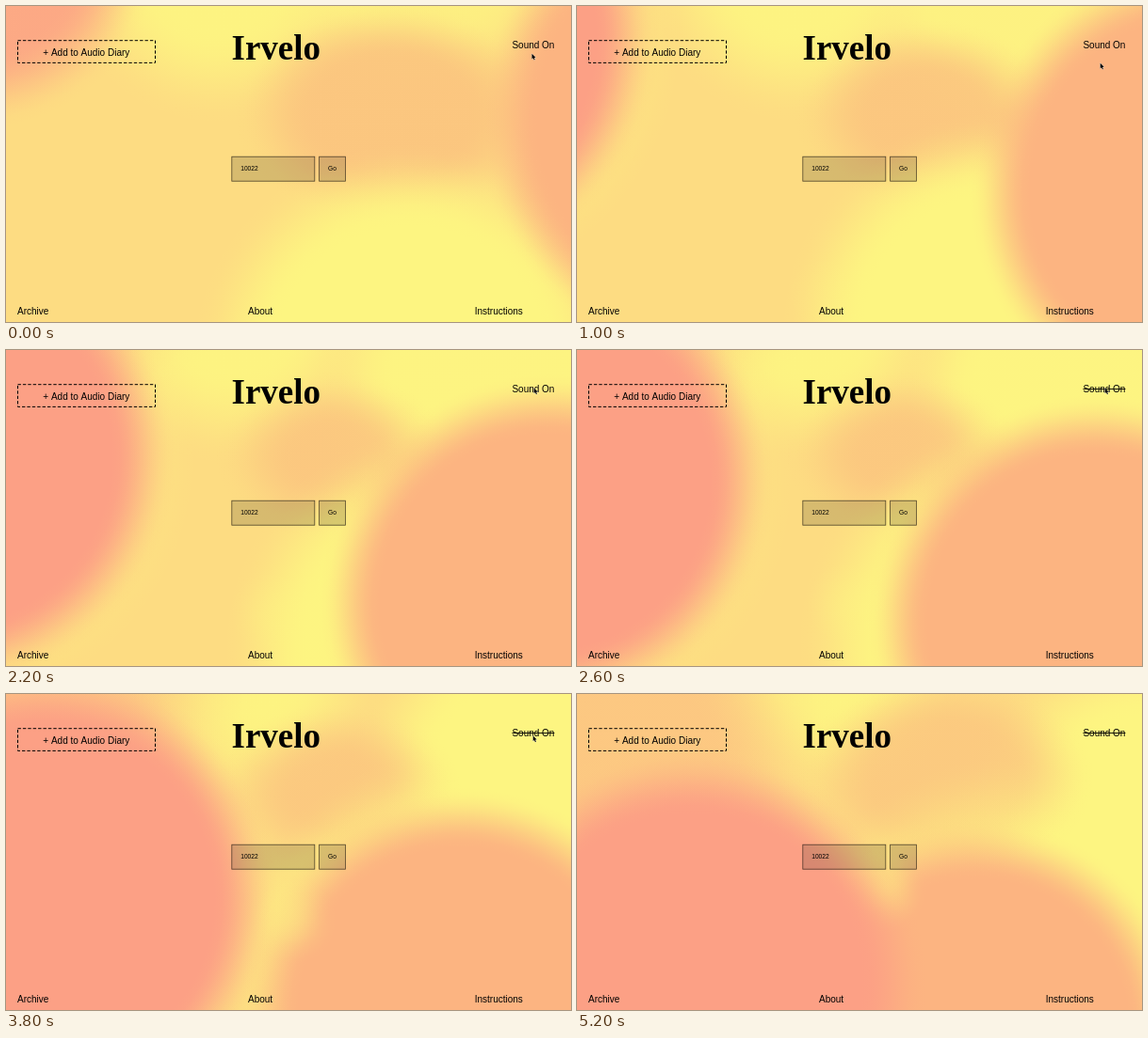
Recreate the animation shown at these times as an HTML page with a canvas. Size 600x336 px, loop 5.3 s.

```html
<!DOCTYPE html>
<html lang="en">
<head>
<meta charset="utf-8">
<title>Irvelo</title>
<style>
  html, body { margin: 0; width: 100%; height: 100%; overflow: hidden; background: #fddc82; }
  canvas { display: block; width: 600px; height: 336px; }
</style>
</head>
<body>
<canvas id="stage" width="600" height="336"></canvas>
<script>
const ctx = document.getElementById('stage').getContext('2d');
const W = 600, H = 336, LOOP = 5300, STEP = 100;
const SANS = '"Liberation Sans", Arial, sans-serif';
const SERIF = '"Liberation Serif", Times, serif';

const BASE = '#fddc82';
const YELLOW = '253,245,129', ORANGE = '252,180,129';
const PEACH = '251,196,127', SALMON = '252,160,133';

const clamp = v => Math.max(0, Math.min(1, v));
const smooth = v => v * v * (3 - 2 * v);
const ramp = (t, from, to) => clamp((t - from) / (to - from));

// Drift from a to b, bowed sideways by bend at the midpoint.
const drift = (a, b, bend = 0) => u => a + (b - a) * u + bend * 4 * u * (1 - u);
const still = v => () => v;

const salmonX = drift(-245, 122, 22), salmonY = drift(-30, 308);

// Soft discs from back to front.
const BLOBS = [
  { color: YELLOW, x: drift(225, 265), y: drift(-45, -25), r: drift(122, 95), soft: 50, alpha: still(0.92) },
  { color: YELLOW, x: salmonX, y: salmonY, r: still(240), soft: 36, alpha: drift(0.4, 0.1) },
  { color: ORANGE, x: drift(40, 60), y: drift(-290, 60), r: still(150), soft: 70, alpha: still(0.5) },
  { color: YELLOW, x: drift(440, 625, 10), y: drift(-75, 165), r: drift(140, 190), soft: 45, alpha: drift(0.75, 1, 0.1) },
  { color: PEACH, x: drift(410, 392, -55), y: drift(115, 88, 10), r: drift(125, 115, -38),
    ratio: 0.72, soft: 42, alpha: drift(0.9, 0.75) },
  { color: YELLOW, x: drift(430, 455, 25), y: drift(380, 300, -30), r: still(190), soft: 44, alpha: drift(1, 0.5, 0.2) },
  { color: ORANGE, x: drift(757, 424, -40), y: drift(120, 360, 50), r: drift(225, 195), soft: 32, alpha: still(1) },
  { color: YELLOW, x: drift(250, 324), y: drift(330, 208), r: still(24), soft: 24, alpha: drift(0, 0.5) },
  { color: SALMON, x: drift(-30, -630), y: drift(-60, -260), r: still(150), soft: 40, alpha: still(0.85) },
  { color: SALMON, x: salmonX, y: salmonY, r: still(215), soft: 34, alpha: still(1) }
];

function drawBlob({ color, x, y, r, soft, alpha, ratio = 1 }, u) {
  const radius = r(u), opacity = clamp(alpha(u));
  const outer = radius + soft;
  const gradient = ctx.createRadialGradient(0, 0, Math.max(0, radius - soft), 0, 0, outer);
  for (let k = 0; k <= 8; k++) {
    gradient.addColorStop(k / 8, `rgba(${color},${opacity * (1 - smooth(k / 8))})`);
  }
  ctx.save();
  ctx.translate(x(u), y(u));
  ctx.scale(1, ratio);
  ctx.fillStyle = gradient;
  ctx.beginPath();
  ctx.arc(0, 0, outer, 0, Math.PI * 2);
  ctx.fill();
  ctx.restore();
}

function text(str, x, y, size = 10, family = SANS, weight = '') {
  ctx.font = `${weight} ${size}px ${family}`;
  ctx.fillStyle = '#000';
  ctx.fillText(str, x, y);
}

function field(x, w, label, labelX) {
  ctx.fillStyle = 'rgba(0,0,0,0.15)';
  ctx.fillRect(x, 160, w, 26.5);
  ctx.strokeStyle = 'rgba(20,15,10,0.7)';
  ctx.lineWidth = 0.8;
  ctx.strokeRect(x, 160.2, w, 26);
  text(label, labelX, 175.3, 6.67);
}

function drawPage() {
  ctx.strokeStyle = '#000';
  ctx.lineWidth = 1;
  ctx.setLineDash([3.4, 2]);
  ctx.strokeRect(12.5, 36.7, 146, 23.7);
  ctx.setLineDash([]);
  text('+ Add to Audio Diary', 39.3, 52.7);
  text('Irvelo', 239.5, 56.5, 37, SERIF, 'bold');
  field(239.8, 88, '10022', 249.2);
  field(332.6, 27.8, 'Go', 342);
  text('Archive', 12, 327.7);
  text('About', 257, 327.7);
  text('Instructions', 497.7, 327.7);
}

// The label blurs while the pointer rests on it; a click strikes it out.
function drawSound(t) {
  const hover = 1 - ramp(t, 0, 300) + ramp(t, 1300, 1600) - ramp(t, 3900, 4200);
  ctx.save();
  if (hover > 0) ctx.filter = `blur(${0.75 * hover}px)`;
  text('Sound On', 537.4, 44.8);
  if (t >= 2600) ctx.fillRect(537.4, 41, 45, 0.9);
  ctx.restore();
}

function drawCursor(t) {
  if (t >= 4200) return;
  const away = smooth(ramp(t, 0, 600)), back = smooth(ramp(t, 1200, 1600));
  const leave = Math.max(0, (t - 3700) / 100);
  ctx.save();
  ctx.translate(558.5 - 2.8 * away + 5 * back - leave, 50.8 + 10 * away - 20.3 * back + 4 * leave * leave);
  const arrow = new Path2D('M0 0V5.6L1.3 4.4 2.3 6.7 3.2 6.3 2.3 4.1 4 4Z');
  ctx.lineWidth = 0.7;
  ctx.strokeStyle = 'rgba(255,255,255,0.75)';
  ctx.stroke(arrow);
  ctx.fillStyle = '#000';
  ctx.fill(arrow);
  ctx.restore();
}

function draw(t) {
  ctx.fillStyle = BASE;
  ctx.fillRect(0, 0, W, H);
  BLOBS.forEach(blob => drawBlob(blob, t / (LOOP - STEP)));
  drawPage();
  drawSound(t);
  drawCursor(t);
}

const start = performance.now();
function tick() {
  const elapsed = (performance.now() - start) % LOOP;
  draw(Math.floor(elapsed / STEP) * STEP);
  requestAnimationFrame(tick);
}
tick();
</script>
</body>
</html>
```
